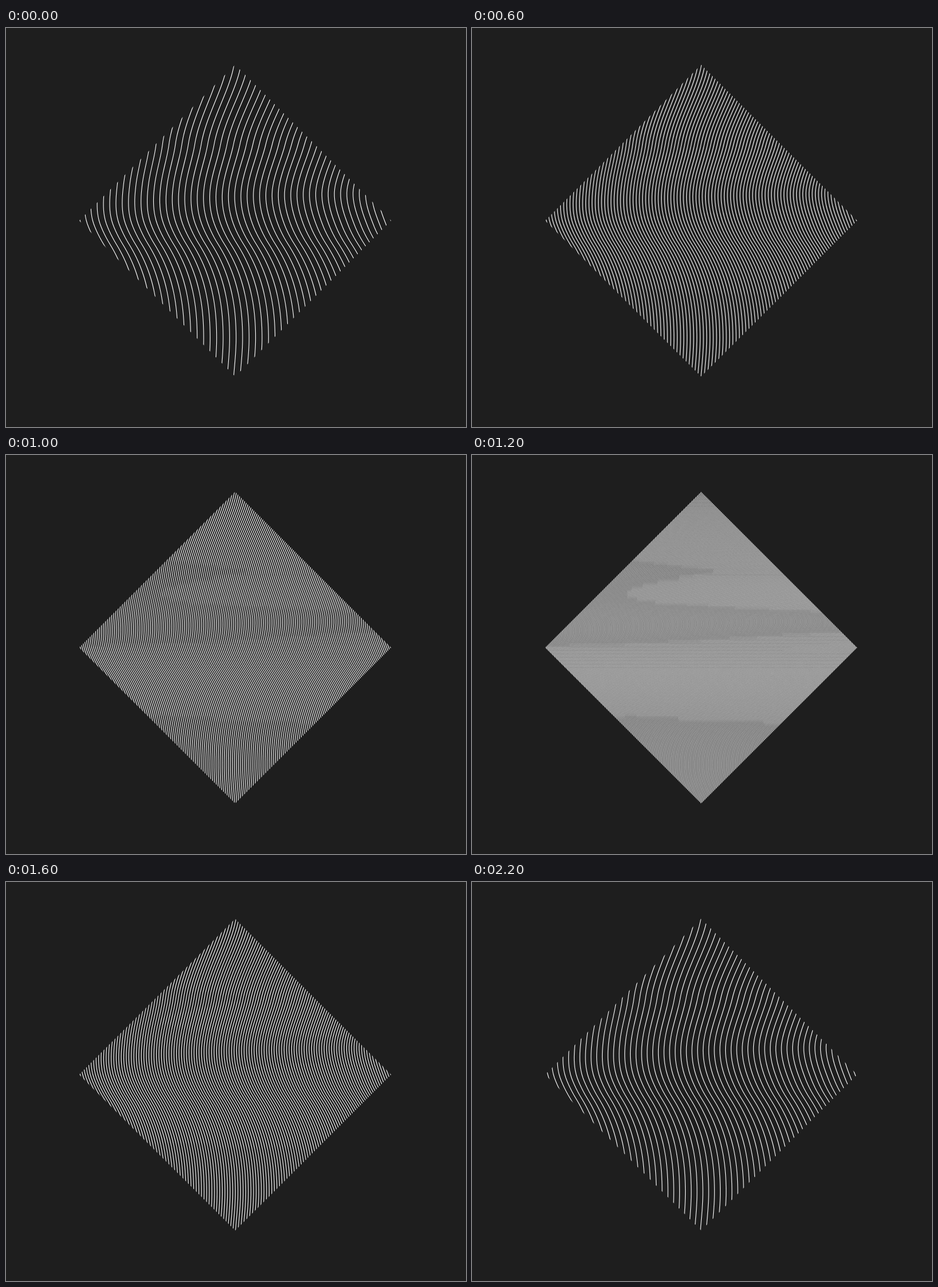
An HTML page with a canvas for the animation above (2400 ms loop, 803 by 697 pixels).

```html
<!DOCTYPE html>
<html>
<head>
<meta charset="utf-8">
<title>Wave diamond</title>
<style>
html, body { margin: 0; width: 100%; height: 100%; overflow: hidden; background: #1e1e1e; }
canvas { display: block; }
</style>
</head>
<body>
<canvas id="stage" width="803" height="697"></canvas>
<script>
const ctx = document.getElementById('stage').getContext('2d');
const CX = 400, CY = 336.5, R = 272.3;
const STEP_MS = 200, UNIT = 11.06;
const SPAN = 675;      // distance between the two outer waves
const LENGTH = 604.5;  // the same distance in the units of the densities below

// Wanted distance between neighbouring waves: dense, then back again
const inward = [10, 9, 7, 5, 4, 3];
const distances = [...inward, 2, ...inward.slice(1).reverse()];

// Piecewise cubic through [y, value, slope] knots
function curve(knots) {
  return y => {
    let i = 0;
    while (i < knots.length - 2 && y > knots[i + 1][0]) i++;
    const [y0, v0, m0] = knots[i], [y1, v1, m1] = knots[i + 1];
    const h = y1 - y0, t = (y - y0) / h;
    return v0 + (v1 - v0) * t * t * (3 - 2 * t)
      + h * t * (1 - t) * (m0 * (1 - t) - m1 * t);
  };
}

// Sideways bend of the wave, and how far neighbours spread, by height
const bend = curve([
  [60, -5.4, .012], [203, -1.25, .018], [294, .58, 0],
  [378, -1.84, -.057], [542, -5.65, 0], [612, -5.25, .007]
]);
const spread = curve([
  [60, 12, 0], [275, 10.87, -.003], [345, 11.08, 0], [542, 11.32, 0], [612, 11.2, 0]
]);

const rows = [];
for (let y = 60; y <= 612; y += 6) {
  const s = spread(y);
  rows.push({ y, scale: s / UNIT, shift: CX - s * bend(y) });
}

function draw(distance) {
  const gaps = Math.ceil(LENGTH / distance);
  ctx.fillStyle = '#1e1e1e';
  ctx.fillRect(0, 0, 803, 697);
  ctx.save();
  ctx.beginPath();
  ctx.moveTo(CX, CY - R);
  ctx.lineTo(CX + R, CY);
  ctx.lineTo(CX, CY + R);
  ctx.lineTo(CX - R, CY);
  ctx.clip();
  ctx.strokeStyle = '#fff';
  ctx.lineWidth = 1.12;
  for (let k = 0; k <= gaps; k++) {
    const offset = (k / gaps - .5) * SPAN;
    ctx.beginPath();
    for (const { y, scale, shift } of rows) ctx.lineTo(shift + offset * scale, y);
    ctx.stroke();
  }
  ctx.restore();
}

const start = performance.now();
let shown = -1;
function tick() {
  const i = Math.floor((performance.now() - start) / STEP_MS) % distances.length;
  if (i !== shown) draw(distances[shown = i]);
  requestAnimationFrame(tick);
}
tick();
</script>
</body>
</html>
```
